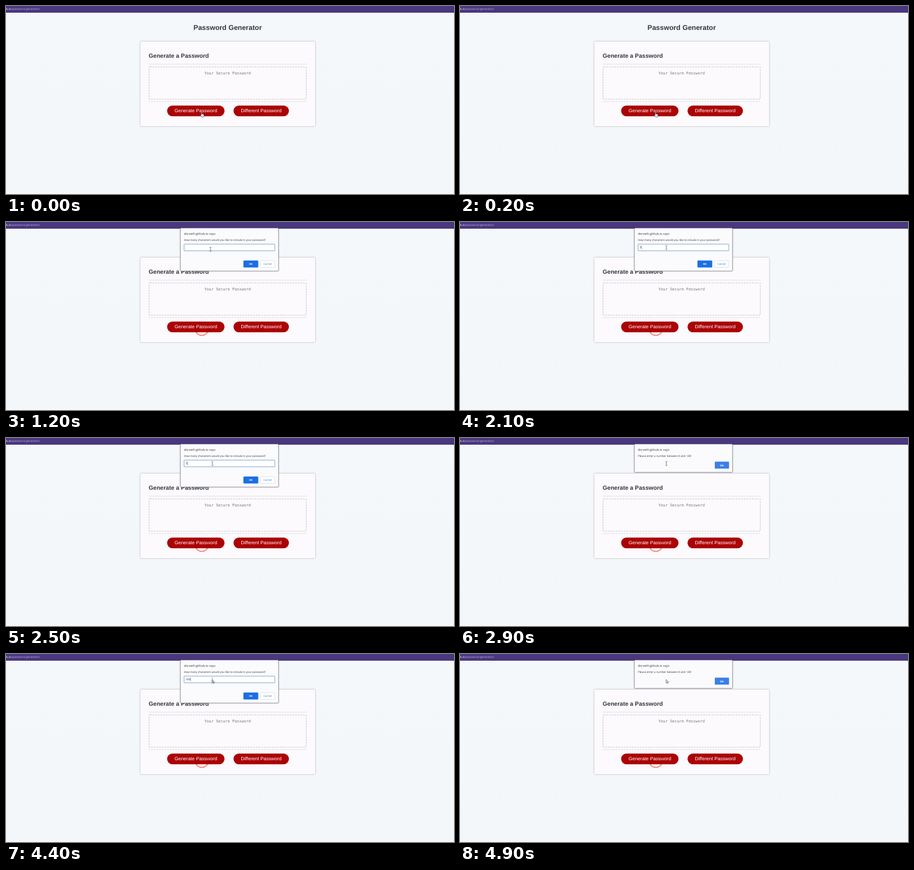
An HTML page that plays this animation: 800x338 px, repeating every 5 s.

```html
<!DOCTYPE html>
<html lang="en">
<head>
<meta charset="utf-8">
<title>Password Generator</title>
<style>
  html, body { margin: 0; width: 100%; height: 100%; overflow: hidden; background: #f4f7fa; }
  svg { display: block; width: 800px; height: 338px; }
  text { font-family: "Liberation Sans", Arial, sans-serif; text-rendering: geometricPrecision; }
  .mid { text-anchor: middle; }
  .head { font-weight: bold; fill: #35363f; }
  .btn { font-size: 8.6px; fill: #fff; }
  .mono { font: 6.9px "DejaVu Sans Mono", monospace; fill: #757575; }
  .ui text, .url { font-family: "Open Sans", "Noto Sans", sans-serif; }
  .ui text { font-size: 4.78px; fill: #33353a; }
  .ui .from { font-size: 5.44px; }
  .ui .ok { font-size: 4.4px; font-weight: bold; fill: #fff; }
  .ui .cancel { font-size: 4.7px; fill: #2f75d6; }
  .url { font-size: 5.11px; fill: #b9aedb; }
  .box { fill: #fbfafd; stroke: #96969c; stroke-width: .8; filter: drop-shadow(0 .8px 1.2px rgba(0,0,0,.4)); }

  /* One 5 s timeline; everything holds between keys unless it moves. */
  .a { animation: 5s step-end infinite; }
  .prompt { animation-name: prompt; }
  .alert { animation-name: alert; }
  .five { animation-name: five; }
  .two { animation-name: two; }
  .zero1 { animation-name: zero1; }
  .zero2 { animation-name: zero2; }
  .caret { animation-name: caret; }
  .hand { animation-name: hand; }
  .arrow { animation-name: arrow; }
  .beam { animation-name: beam; }
  .ring { animation-name: ring; mix-blend-mode: multiply; transform-box: fill-box; transform-origin: center; }

  @keyframes prompt { 0% { opacity: 0 } 10% { opacity: 1 } 52% { opacity: 0 } 64% { opacity: 1 } 94%, 100% { opacity: 0 } }
  @keyframes alert { 0% { opacity: 0 } 52% { opacity: 1 } 64% { opacity: 0 } 94%, 100% { opacity: 1 } }
  @keyframes five { 0% { opacity: 0 } 42% { opacity: 1 } 52%, 100% { opacity: 0 } }
  @keyframes two { 0% { opacity: 0 } 74%, 100% { opacity: 1 } }
  @keyframes zero1 { 0% { opacity: 0 } 78%, 100% { opacity: 1 } }
  @keyframes zero2 { 0% { opacity: 0 } 84%, 100% { opacity: 1 } }
  @keyframes caret {
    0% { opacity: 1; transform: none }
    22% { opacity: 0; transform: none }
    32% { opacity: 1; transform: none }
    42% { opacity: 1; transform: translateX(2.8px) }
    64% { opacity: 1; transform: none }
    74% { opacity: 1; transform: translateX(2.8px) }
    78% { opacity: 1; transform: translateX(5.5px) }
    84%, 100% { opacity: 1; transform: translateX(8.2px) }
  }
  @keyframes hand { 0% { opacity: 1 } 8%, 100% { opacity: 0 } }
  @keyframes arrow {
    0% { opacity: 0; transform: translate(349px, 190px) }
    8% { opacity: 1; transform: translate(353px, 146px); animation-timing-function: steps(2) }
    12% { opacity: 1; transform: translate(361px, 58.5px); animation-timing-function: steps(2) }
    16% { opacity: 0; transform: translate(363px, 52px) }
    86%, 100% { opacity: 1; transform: translate(368px, 45.7px) }
  }
  @keyframes beam {
    0% { opacity: 0; transform: translate(363px, 51px) }
    16% { opacity: 1; transform: translate(363px, 51px); animation-timing-function: steps(10) }
    36% { opacity: 1; transform: translate(368.5px, 46px) }
    86% { opacity: .55; transform: translate(368.5px, 46px) }
    94%, 100% { opacity: 0; transform: translate(368.5px, 46px) }
  }
  @keyframes ring {
    0% { opacity: 0; transform: scale(.2) }
    4% { opacity: 1; transform: scale(.3); animation-timing-function: steps(3) }
    10%, 100% { opacity: 1; transform: none }
  }
</style>
</head>
<body>
<svg viewBox="0 0 800 338">
  <defs>
    <linearGradient id="sky" x2="0" y2="1">
      <stop stop-color="#f4f8fb"/><stop offset="1" stop-color="#f3f7fa"/>
    </linearGradient>
  </defs>
  <rect width="800" height="338" fill="url(#sky)"/>
  <rect y="337" width="800" height="1" fill="#fdfdfe"/>
  <rect width="800" height="12" fill="#4a387f"/>
  <rect y="11" width="800" height="1" fill="#3f2f70"/>
  <text class="url" y="6.9"><tspan fill="#fff">b.io</tspan>/password-generator/</text>

  <text class="head mid" x="395.8" y="43.4" font-size="12.47">Password Generator</text>
  <rect x="240" y="64" width="312" height="152" rx="1" fill="#fcfafd" style="filter:drop-shadow(0 .8px 1.6px rgba(0,0,0,.32))"/>
  <text class="head" x="254.8" y="92.7" font-size="10.57">Generate a Password</text>
  <path d="M255 104.5H537M255 171.8H537" stroke="#dedde2" stroke-width=".9"/>
  <rect x="255.5" y="109.5" width="280.7" height="58" rx="1.5" fill="none" stroke="#c3c2c8" stroke-width="1.1" stroke-dasharray="3 1.8"/>
  <text class="mono mid" x="395.7" y="122.8">Your Secure Password</text>

  <g fill="#ab0305">
    <rect x="287.7" y="179" width="102.5" height="19.2" rx="9.6"/>
    <rect x="406.3" y="179" width="98.9" height="19.2" rx="9.6"/>
  </g>
  <text class="btn mid" x="339" y="191.4">Generate Password</text>
  <text class="btn mid" x="455.7" y="191.4">Different Password</text>
  <circle class="a ring" cx="349.7" cy="192" r="11.8" fill="none" stroke="#f2736b" stroke-width="1.6"/>

  <g class="a ui prompt">
    <rect class="box" x="311.5" y="11" width="175" height="77" rx="1"/>
    <text class="from" x="317.7" y="23.4">dorveth.github.io says</text>
    <text x="317.8" y="34.4">How many characters would you like to include in your password?</text>
    <rect x="318" y="39.8" width="162" height="12" rx=".8" fill="#fff" stroke="#6f9bc9" stroke-width=".9"/>
    <text class="a five" x="321" y="47.4">5</text>
    <text class="a two" x="321" y="47.4">2</text>
    <text class="a zero1" x="323.74" y="47.4">0</text>
    <text class="a zero2" x="326.48" y="47.4">0</text>
    <path class="a caret" d="M321.1 42.3V48.8" stroke="#2a2c33" stroke-width=".6"/>
    <rect x="424" y="69.2" width="26.4" height="12.6" rx="1.2" fill="#1a6fe3"/>
    <text class="ok mid" x="437.1" y="77.1">OK</text>
    <rect x="453.8" y="69.5" width="26.4" height="12" rx="1.2" fill="#fdfdff" stroke="#d9dbe2" stroke-width=".7"/>
    <text class="cancel mid" x="467" y="77.2">Cancel</text>
  </g>

  <g class="a ui alert">
    <rect class="box" x="311.5" y="11" width="175" height="50.5" rx="1"/>
    <text class="from" x="317.7" y="23.4">dorveth.github.io says</text>
    <text x="317.8" y="34.4">Please enter a number between 8 and 128!</text>
    <rect x="455" y="42.6" width="25.4" height="12.5" rx="1.2" fill="#3b80e6"/>
    <text class="ok mid" x="467.4" y="50.5">OK</text>
  </g>

  <g stroke="#222" stroke-width=".6" stroke-linejoin="round" fill="#fff">
    <path class="a hand" d="M348.6 190.8q.7-.7 1.3 0V194l2.6.5q1 .2 1 1.2l-.5 2.6-.6 1.5h-3l-2.3-3.3q-.2-1 .7-.8l.8.6Z"/>
    <path class="a arrow" d="M0 0V6.3L1.5 5 2.5 7.3 3.5 6.9 2.6 4.6H4.4Z"/>
    <path class="a beam" fill="none" stroke="#333" stroke-width=".7" d="M-1.5-3.6H-.4L0-3.2.4-3.6H1.5M0-3.2V3.2M-1.5 3.6H-.4L0 3.2.4 3.6H1.5"/>
  </g>
</svg>
</body>
</html>
```
